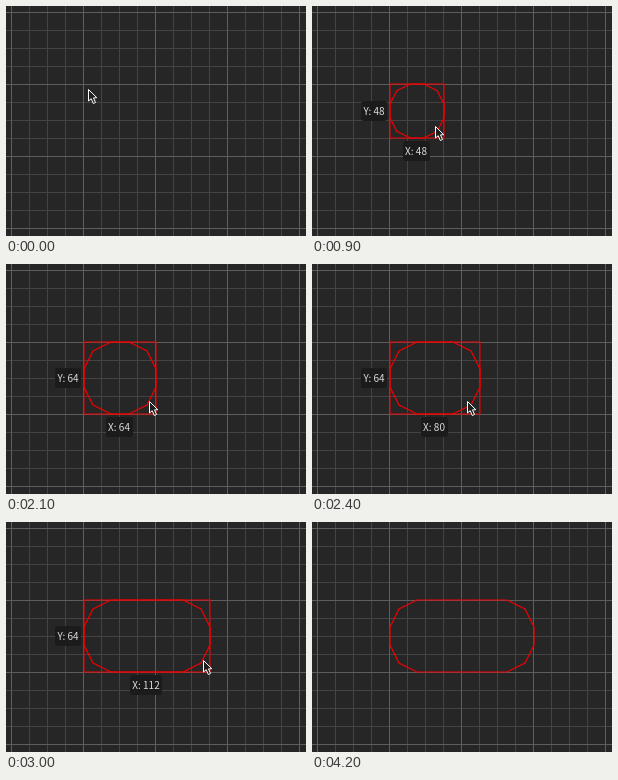
These frames come from a looping animation (300x230 px, 7750 ms). An HTML page with a canvas:

```html
<!DOCTYPE html>
<html lang="en">
<head>
<meta charset="utf-8">
<title>Drawing a rounded shape on a grid</title>
<style>
  html, body { margin: 0; width: 100%; height: 100%; overflow: hidden; background: #262626; }
  canvas { display: block; }
</style>
</head>
<body>
<canvas id="stage" width="300" height="230"></canvas>
<script>
const ctx = document.getElementById('stage').getContext('2d');
const LOOP = 7750, STEP = 100, PRESS = 300, RELEASE = 3800;
const CELL = 18, UNITS = 16, LEFT = 78, TOP = 78;

const easeOut = t => Math.sin(t * Math.PI / 2);
const easeInOut = t => t * t * (3 - 2 * t);
const easeIn = t => t * t;

// Cursor path: every leg starts where the previous one ended
const home = { x: 82, y: 83 };
const legs = [
  { start: 250, end: 1600, x: 142, y: 137, ease: easeOut },
  { start: 2000, end: 3400, x: 210, y: 138, ease: easeInOut },
  { start: 3700, end: 4200, x: 260, y: 250, ease: easeIn },
];

function cursorAt(time) {
  let { x, y } = home;
  for (const leg of legs) {
    const progress = Math.min(1, Math.max(0, (time - leg.start) / (leg.end - leg.start)));
    const amount = leg.ease(progress);
    x += (leg.x - x) * amount;
    y += (leg.y - y) * amount;
  }
  return { x, y };
}

// Number of grid cells a drag covers, with a little slack past each line
const snap = (distance, slack) => Math.max(1, Math.ceil(distance / CELL - slack));

function drawGrid() {
  ctx.fillStyle = '#262626';
  ctx.fillRect(0, 0, 300, 230);
  for (const major of [false, true]) {
    const gap = major ? CELL * 4 : CELL;
    ctx.fillStyle = major ? '#5e5e5e' : '#434343';
    for (let x = 5; x < 300; x += gap) ctx.fillRect(x, 0, 1, 230);
    for (let y = 6; y < 230; y += gap) ctx.fillRect(0, y, 300, 1);
  }
}

function tracePolygon(points) {
  ctx.beginPath();
  points.forEach(([x, y]) => ctx.lineTo(x, y));
  ctx.closePath();
}

function drawShape(width, height) {
  const radius = Math.min(width, height) / 2;
  const near = radius / 4, far = radius * 3 / 4;
  const right = LEFT + width, bottom = TOP + height;
  tracePolygon([
    [LEFT, TOP + far], [LEFT + near, TOP + near], [LEFT + far, TOP],
    [right - far, TOP], [right - near, TOP + near], [right, TOP + far],
    [right, bottom - far], [right - near, bottom - near], [right - far, bottom],
    [LEFT + far, bottom], [LEFT + near, bottom - near], [LEFT, bottom - far],
  ]);
  ctx.stroke();
}

function drawLabel(text, x, y) {
  ctx.font = '10px "Noto Sans CJK JP", "Noto Sans CJK SC", "Noto Sans CJK", sans-serif';
  ctx.textAlign = 'center';
  const width = Math.round(ctx.measureText(text).width) + 5;
  ctx.fillStyle = '#1b1b1b';
  ctx.beginPath();
  ctx.roundRect(Math.round(x - width / 2), Math.round(y - 10), width, 20, 3);
  ctx.fill();
  ctx.fillStyle = '#dedede';
  ctx.fillText(text, x, Math.round(y + 4));
}

function drawCursor({ x, y }) {
  ctx.save();
  ctx.translate(Math.round(x) + .5, Math.round(y) + .5);
  tracePolygon([[0, 0], [0, 11.5], [2.7, 9.2], [4.8, 14], [7, 13], [5, 8.4], [8.3, 8.2]]);
  ctx.fillStyle = '#202020';
  ctx.fill();
  ctx.strokeStyle = '#fff';
  ctx.lineWidth = 1;
  ctx.stroke();
  ctx.restore();
}

function render(elapsed) {
  const time = Math.floor(elapsed / STEP) * STEP;
  drawGrid();
  if (time >= PRESS) {
    const corner = cursorAt(Math.min(time, RELEASE - STEP));
    const columns = snap(corner.x - LEFT, .2), rows = snap(corner.y - TOP, .11);
    const width = columns * CELL, height = rows * CELL;
    ctx.strokeStyle = '#f00000';
    ctx.lineWidth = 1.2;
    drawShape(width, height);
    if (time < RELEASE) {
      ctx.lineWidth = 1;
      ctx.strokeRect(LEFT, TOP, width, height);
      drawLabel(`Y: ${rows * UNITS}`, LEFT - 16, TOP + height / 2);
      drawLabel(`X: ${columns * UNITS}`, LEFT + width / 2 - 1, TOP + height + 13);
    }
  }
  drawCursor(cursorAt(time));
}

const begin = performance.now();
function tick() {
  render((performance.now() - begin) % LOOP);
  requestAnimationFrame(tick);
}
tick();
</script>
</body>
</html>
```
